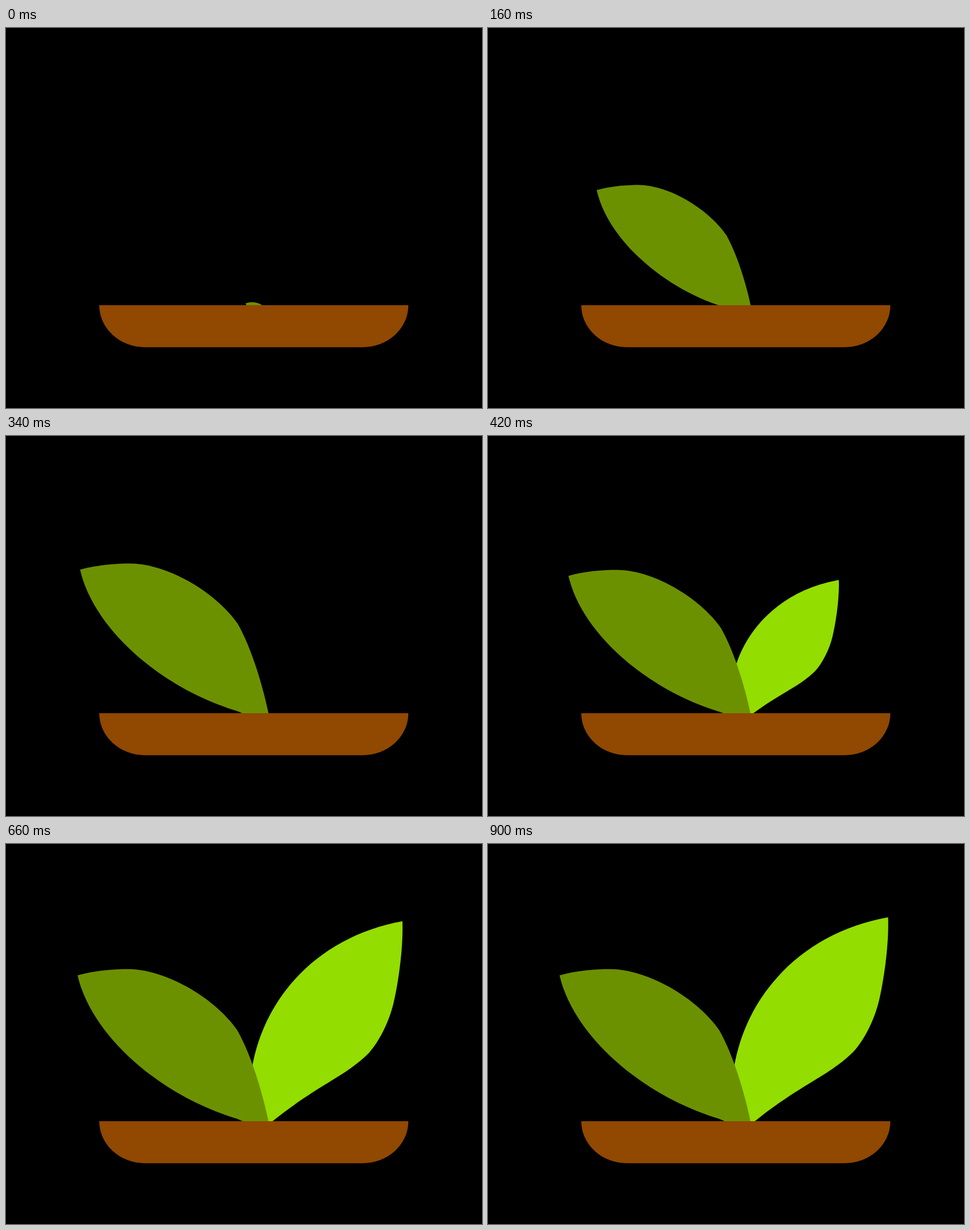
Recreate the animation shown at these times as an HTML page. Size 837 by 669 pixels, loop 0.98 s.

```html
<!DOCTYPE html>
<html lang="en">
<head>
<meta charset="utf-8">
<title>Sprout</title>
<style>
  html, body { margin: 0; width: 100%; height: 100%; overflow: hidden; background: #000; }
  svg { display: block; width: 837px; height: 669px; }
</style>
</head>
<body>
<svg viewBox="0 0 837 669">
  <path id="light" fill="#93dd00" d="M725 108C570 135 456 245 433 391C428 440 428 490 432 519L440 515L471 488C535 436 598 406 630 382C640 375 651 366 660 357C680 335 699 299 708 262C718 220 727 155 725 108Z"/>
  <path id="dark" fill="#6c9100" d="M106.5 212C140 203 172 200.5 200 200.5C275 200.5 365 259 403 315C430 363 451 436 461.5 488L470 534C460 518 440 500 418 488C405 480 396 479 380 473C253 429 131 322 106.5 212Z"/>
  <path fill="#914800" d="M164 488H707.5A80 74 0 0 1 627.5 562H244A80 74 0 0 1 164 488Z"/>
</svg>
<script>
  const LOOP = 980, STEP = 20;
  const sine = p => (1 - Math.cos(Math.PI * p)) / 2;
  const cubic = p => p < 0.5 ? 4 * p ** 3 : 1 - 4 * (1 - p) ** 3;

  // keys: [time, scaleX, scaleY, easing towards this key]
  const leaves = [
    { el: document.getElementById('dark'), x: 473, y: 534, keys: [
      [0, 0.1405, 0.154],
      [245, 1, 1, sine],
      [400, 0.9037, 0.893, sine],
      [620, 0.947, 0.9405, sine]
    ] },
    { el: document.getElementById('light'), x: 419.4, y: 519, keys: [
      [296, 0, 0],
      [520, 1.003, 1.003, cubic],
      [680, 0.9047, 0.929, sine],
      [900, 0.9296, 0.9489, sine]
    ] }
  ];

  function scaleAt(keys, t) {
    if (t <= keys[0][0]) return keys[0].slice(1, 3);
    const i = keys.findIndex(k => k[0] > t);
    if (i < 0) return keys[keys.length - 1].slice(1, 3);
    const a = keys[i - 1], b = keys[i];
    const p = b[3]((t - a[0]) / (b[0] - a[0]));
    return [1, 2].map(n => a[n] + (b[n] - a[n]) * p);
  }

  function draw(t) {
    for (const { el, x, y, keys } of leaves) {
      const [sx, sy] = scaleAt(keys, t);
      el.setAttribute('visibility', sx > 0 ? 'visible' : 'hidden');
      el.setAttribute('transform', `translate(${x} ${y}) scale(${sx} ${sy}) translate(${-x} ${-y})`);
    }
  }

  const start = performance.now();
  function tick() {
    const t = (performance.now() - start) % LOOP;
    draw(Math.floor(t / STEP) * STEP);
    requestAnimationFrame(tick);
  }
  draw(0);
  requestAnimationFrame(tick);
</script>
</body>
</html>
```
